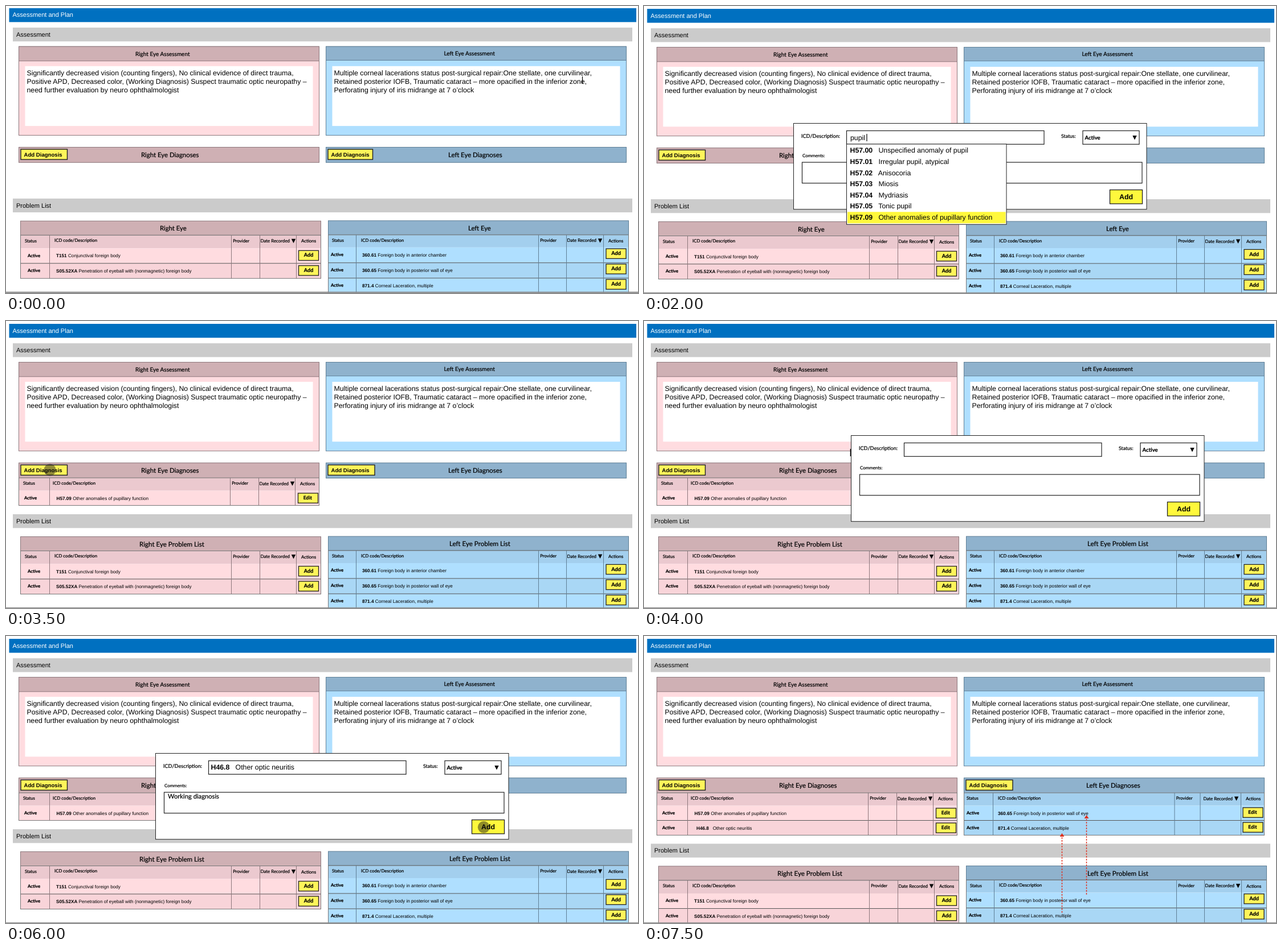
These frames come from a looping animation (1109 px wide and 505 px high, 8 s). An HTML page:

```html
<!DOCTYPE html>
<html lang="en">
<head>
<meta charset="utf-8">
<title>Assessment and Plan</title>
<style>
  html, body { margin: 0; width: 100%; height: 100%; overflow: hidden; background: #fff; }
  svg { display: block; }
  text { white-space: pre; font-family: "Liberation Sans", Arial, sans-serif; text-rendering: geometricPrecision; }
  .lato { font-family: Lato, "Open Sans", sans-serif; stroke: #000; stroke-width: .22px; }
  .bold { font-weight: 700; }
</style>
</head>
<body>
<svg id="stage" width="1109" height="505" viewBox="0 0 1109 505"></svg>
<script>
const STEP = 500, STEPS = 16;
const INK = '#000', YELLOW = '#fff45a', BRIGHT = '#fff83c';
const PINK = { head: '#cfb0b4', cols: '#ebc9cf', body: '#ffdce0', alt: '#f8d4d9', line: '#8d777c' };
const BLUE = { head: '#8fb2cd', cols: '#a3cfee', body: '#afdfff', alt: '#a9d7f5', line: '#5f7f96' };

const PUPIL_LIST = [
  ['H57.00', 'Unspecified anomaly of pupil'], ['H57.01', 'Irregular pupil, atypical'],
  ['H57.02', 'Anisocoria'], ['H57.03', 'Miosis'], ['H57.04', 'Mydriasis'],
  ['H57.05', 'Tonic pupil'], ['H57.09', 'Other anomalies of pupillary function'],
];
const NEURITIS_LIST = [
  ['H46', 'Optic neuritis', 6], ['H46.8', 'Other optic neuritis'], ['H46.9', 'Unspecified optic neuritis'],
  ['036.81', 'Meningococcal optic neuritis', 2], ['H46.10', 'Retrobulbar neuritis, unspecified eye', 2],
  ['377.32', 'Retrobulbar neuritis (acute)'],
];
const PUPIL = ['H57.09', 'Other anomalies of pupillary function'];
const NEURITIS = ['H46.8', 'Other optic neuritis'];
const CHAMBER = ['360.61', 'Foreign body in anterior chamber'];
const WALL = ['360.65', 'Foreign body in posterior wall of eye'];
const CORNEA = ['871.4', 'Corneal Laceration, multiple'];

// Boxes are given by their two corners.
const box = (x1, y1, x2, y2, fill, stroke = 'none', width = 1) =>
  `<rect x="${x1}" y="${y1}" width="${x2 - x1}" height="${y2 - y1}" fill="${fill}" stroke="${stroke}" stroke-width="${width}"/>`;
const line = (x1, y1, x2, y2, color, width = 1, dash = '') =>
  `<path d="M${x1} ${y1}L${x2} ${y2}" stroke="${color}" stroke-width="${width}" stroke-dasharray="${dash}"/>`;
const text = (x, y, s, size, cls = '', fill = INK) =>
  `<text x="${x}" y="${y}" font-size="${size}" class="${cls}" fill="${fill}">${s}</text>`;
const lato = (x, y, s, size, cls = '') => text(x, y, s, size, 'lato ' + cls);
const coded = (x, y, [code, name, gap = 3], size) =>
  text(x, y, `<tspan class="bold">${code}</tspan>${' '.repeat(gap)}${name}`, size);
const move = (dx, dy, s) => `<g transform="translate(${dx} ${dy})">${s}</g>`;
const caret = (x, y) => line(x, y, x, y + 13, '#000', 1.2);
const triangle = (x, y) => `<path d="M${x - 3.7} ${y - 3.7}h7.4l-3.7 7.4z" fill="#000"/>`;
const touch = (x, y) => `<circle cx="${x}" cy="${y}" r="10.5" fill="#111" fill-opacity=".46"/>`;
const arrow = (x, from, to, color) => line(x, from, x, to + 5, color, 1.4, '3 2') +
  `<path d="M${x - 4} ${to + 6}h8l-4 -6z" fill="${color}"/>`;

function titleBar(y, label) {
  return box(12, y, 1099, y + 24.3, '#cbcbcb') + text(18, y + 15.8, label, 11);
}

function smallButton(x, y, label) {
  return box(x, y, x + 35, y + 17.3, YELLOW, '#222', 1.3) +
    lato(x + 9.3, y + 11.2, label, label === 'Add' ? 9.1 : 8.6, 'bold');
}

function assessment(x, titleX, titleY, colors, title, lines) {
  return box(x, 72.5, x + 527, 228.7, colors.body, colors.line) +
    box(x, 72.5, x + 527, titleY + 8.7, colors.head, colors.line) +
    lato(titleX, titleY, title, 10) +
    box(x + 11, 107, x + 516, 212.3, '#fff') +
    lines.map((s, i) => text(x + 14, 122.9 + i * 15.1, s, 12.32)).join('');
}

// A table of rows below column headings; "cols" holds the four divider positions.
function tableBody({ x, right, y, colors, cols, statusX, activeX, codeX, icdX, buttonX, buttonDy, action,
                     rows, headH, rowH, dateX = cols[2] + 1 }) {
  if (!rows.length) return '';
  const first = y + headH, bottom = first + rows.length * rowH;
  let s = box(x, y, right, first, colors.cols) +
    lato(statusX, y + 12.3, 'Status', 7.7) + lato(icdX, y + 11.8, 'ICD code/Description', 7.8) +
    lato(cols[1] + 2.7, y + 12.3, 'Provider', 7.8) + lato(dateX, y + 12.5, 'Date Recorded', 7.9) +
    triangle(dateX + 58, y + 10.2) + lato(cols[3] + 8.5, y + 13, 'Actions', 7.9);
  rows.forEach(([code, name, gap = 1, indent = 0], i) => {
    const top = first + i * rowH;
    s += box(x, top, right, top + rowH, i % 2 ? colors.alt : colors.body);
    if (i) s += line(x, top, right, top, '#555');
    s += lato(activeX, top + 15.3, 'Active', 7.8, 'bold') +
      coded(codeX + indent, top + 16, [code, name, gap], 8.2);
  });
  s += cols.map(c => line(c, y, c, bottom, colors.line)).join('') +
    box(x, y, right, bottom, 'none', '#777');
  rows.forEach((_, i) => s += smallButton(buttonX, first + i * rowH + buttonDy, action));
  return s;
}

function diagnoses(n) {
  const rightRows = n < 7 ? [] : n < 13 ? [PUPIL] : [PUPIL, [...NEURITIS, 3, 3.5]];
  const leftRows = [WALL, CORNEA].slice(0, Math.max(0, n - 13));
  const shared = { y: 276, headH: 22.5, rowH: 26, action: 'Edit' };
  const addButton = (x, right) => box(x, 253.3, right, 271.3, YELLOW, '#222', 1.4) +
    text(x + 5.5, 266, 'Add Diagnosis', 9.6, 'bold');
  return box(22.5, 249.7, 549.5, 276.5, PINK.head, PINK.line) + lato(237, 267, 'Right Eye Diagnoses', 11.4) +
    box(561.5, 249.7, 1088.5, 276.5, BLUE.head, BLUE.line) + lato(776, 267, 'Left Eye Diagnoses', 11.4) +
    addButton(26, 107.5) + addButton(565, n ? 647 : 643.5) +
    tableBody({ ...shared, x: 22.5, right: 549.5, colors: PINK, cols: [76.5, 393.5, 443.5, 507.5],
      statusX: 30, activeX: 32, codeX: 88.5, icdX: 82, buttonX: 512.5, buttonDy: 4.5, rows: rightRows }) +
    tableBody({ ...shared, x: 561.5, right: 1088.5, colors: BLUE, cols: [612.5, 931, 976, 1047.5],
      statusX: 566, activeX: 566, codeX: 621, icdX: 621, buttonX: 1051, buttonDy: 3.5, dateX: 981.5,
      rows: leftRows });
}

function problems(n) {
  const suffix = n < 7 ? '' : ' Problem List';
  const size = n < 7 ? 11.3 : 11.6;
  const leftRows = n < 13 ? [CHAMBER, WALL, CORNEA] : [WALL, CORNEA];
  const shared = { headH: 23, action: 'Add' };
  const s = titleBar(340, 'Problem List') +
    box(25.5, 379.5, 552.5, 404.5, PINK.head, PINK.line) +
    lato(n < 7 ? 270 : 234, 396.7, 'Right Eye' + suffix, size) +
    box(565.5, 379, 1092.5, 403.5, BLUE.head, BLUE.line) +
    lato(n < 7 ? 811 : 778, 396, 'Left Eye' + suffix, size) +
    tableBody({ ...shared, y: 404.5, rowH: 26.5, x: 25.5, right: 552.5, colors: PINK,
      cols: [76.5, 395.5, 445.5, 509.5], statusX: 33, activeX: 38, codeX: 88, icdX: 85,
      buttonX: 513.5, buttonDy: 4, rows: [
        ['T151', 'Conjunctival foreign body'],
        ['S05.52XA', 'Penetration of eyeball with (nonmagnetic) foreign body']] }) +
    (n > 13 ? touch(1078, 434.5) : '') +
    tableBody({ ...shared, y: 404, rowH: 27, headH: 22, x: 565.5, right: 1092.5, colors: BLUE,
      cols: [614.5, 934.5, 983.5, 1048.5], statusX: 572, activeX: 570, codeX: 625, icdX: 623,
      buttonX: 1053, buttonDy: 2.3, rows: leftRows });
  return move(0, n < 13 ? 0 : 25.5, s);
}

function dropdown(list, right, bottom, selected) {
  return box(355.5, 243, right, bottom, '#fff', '#222') +
    (selected < 0 ? '' : box(357, 244.7 + selected * 19.6, right - 1.5, 264.7 + selected * 19.6, BRIGHT)) +
    list.map((row, i) => coded(361.5, 258.4 + i * 19.6, row, 12.32)).join('');
}

function popup(n) {
  let s = box(262.5, 206.5, 882, 357.7, '#fff', '#222') +
    lato(276, 232.3, 'ICD/Description:', 9.1) + box(355.5, 219.5, 702, 243.3, '#fff', '#222', 1.2) +
    lato(732, 232.3, 'Status:', 8.7) + box(770, 219.5, 869, 243.3, '#fff', '#222', 1.2) +
    lato(773.5, 234.7, 'Active', 9.5, 'bold') + triangle(861, 231.7) +
    lato(278, 266, 'Comments:', 7.9) + box(277.5, 275, 874, 311.7, '#fff', '#222', 1.2) +
    box(817.5, 323.5, 874.5, 348, BRIGHT, '#222', 1.3) + text(834, 340.3, 'Add', 12.4, 'bold');
  if (n === 2) s += caret(361.5, 223);
  if (n === 3 || n === 4) s += text(362, 235.9, 'pupil', 12.32) + caret(391, 225) +
    dropdown(PUPIL_LIST, 636, 384.3, n === 4 ? 6 : -1);
  if (n === 5 || n === 6) s += coded(359.5, 235.3, PUPIL, 12.32);
  if (n === 5) s += caret(306.5, 279);
  if (n === 6) s += lato(284, 286.3, 'Positive APD', 11.2) + touch(857.3, 330.3);
  if (n === 9 || n === 10) s += text(362, 235.9, 'neuritis', 12.32) + caret(406, 225) +
    dropdown(NEURITIS_LIST, 695.5, 362.7, n === 10 ? 1 : -1);
  if (n === 11 || n === 12) s += coded(359.5, 235.3, NEURITIS, 12.32);
  if (n === 11) s += caret(310.5, 279);
  if (n === 12) s += lato(284, 286.3, 'Working diagnosis', 11.2) + touch(838.3, 336.3);
  return n === 8 ? caret(362.3, 225) + move(101, -5, s) : s;
}

function scene(n) {
  let s = box(5.5, 5, 1106, 29.5, '#0070c0') +
    text(11.5, 20.6, n === 2 ? 'ß' : 'Assessment and Plan', 11, '', '#fff') +
    titleBar(39.2, 'Assessment') +
    assessment(22.5, 227, 89.2, PINK, 'Right Eye Assessment', [
      'Significantly decreased vision (counting fingers), No clinical evidence of direct trauma,',
      'Positive APD, Decreased color, (Working Diagnosis) Suspect traumatic optic neuropathy –',
      'need further evaluation by neuro ophthalmologist']) +
    assessment(561.5, 768.5, 88, BLUE, 'Left Eye Assessment', [
      'Multiple corneal lacerations status post-surgical repair:One stellate, one curvilinear,',
      'Retained posterior IOFB, Traumatic cataract – more opacified in the inferior zone,',
      'Perforating injury of iris midrange at 7 o’clock']) +
    diagnoses(n) + problems(n) + box(0, 503.9, 1109, 506, '#8a8a8a');
  if (n === 0) s += caret(1011.5, 125);
  if (n === 1 || n === 7) s += touch(77, 262);
  if ((n >= 2 && n <= 6) || (n >= 8 && n <= 12)) s += popup(n);
  if (n === 13) s += arrow(1077, 453, 315, '#f5c518') + touch(1078, 458.5);
  if (n === 14) s += arrow(1077, 481, 343, '#f5c518') + touch(1078, 488.5);
  if (n === 15) s += arrow(776.5, 455, 315, '#e0301e') + arrow(733.5, 487, 347, '#e0301e');
  return n === 0 ? move(0, -1.2, s) : s;
}

const stage = document.getElementById('stage');
let shown = -1;
function tick() {
  const n = Math.floor(performance.now() / STEP) % STEPS;
  if (n !== shown) stage.innerHTML = scene(shown = n);
  requestAnimationFrame(tick);
}
tick();
</script>
</body>
</html>
```
